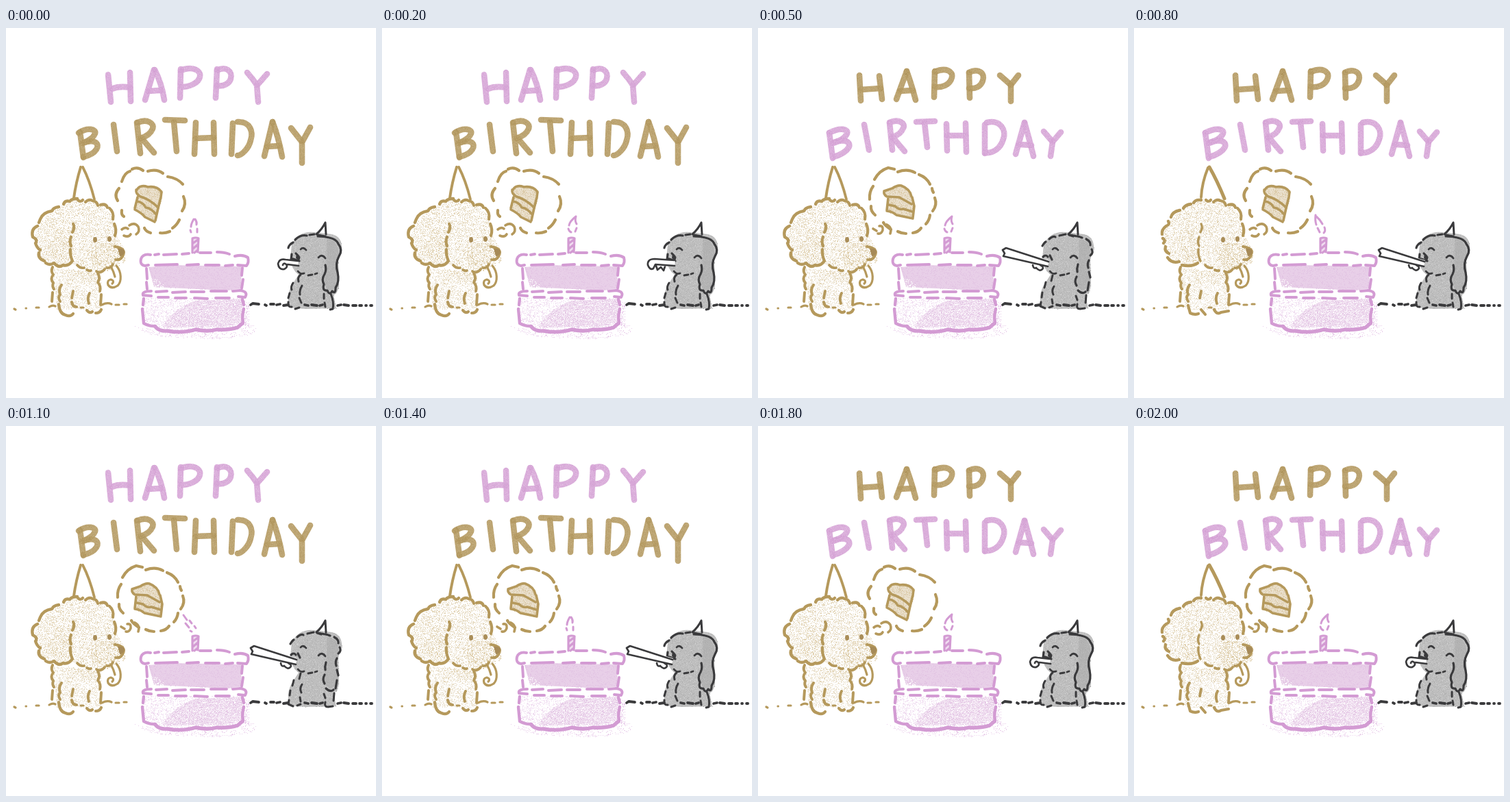
An HTML page with a canvas that plays this animation: 540 by 540 pixels, repeating every 2.1 s.

```html
<!DOCTYPE html>
<html lang="en">
<head>
<meta charset="utf-8">
<title>Happy Birthday</title>
<style>
html, body { margin: 0; width: 100%; height: 100%; overflow: hidden; background: #fff; }
canvas { display: block; width: 540px; height: 540px; }
</style>
</head>
<body>
<canvas id="stage" width="540" height="540" role="img" aria-label="Happy Birthday"></canvas>
<script>
const SIZE = 540, STEP = 100, STEPS = 21;
const TAN = '#b5995c', PINK = '#d39bd3', INK = '#3a3a3c';
const ctx = document.getElementById('stage').getContext('2d');

let seed = 7;
function rand() {
  seed = (seed + 0x6D2B79F5) | 0;
  let t = Math.imul(seed ^ (seed >>> 15), 1 | seed);
  t = (t + Math.imul(t ^ (t >>> 7), 61 | t)) ^ t;
  return ((t ^ (t >>> 14)) >>> 0) / 4294967296;
}

// Every pose is painted once into its own canvas.
function layer(paint, size = SIZE) {
  const c = document.createElement('canvas');
  c.width = c.height = size;
  const g = c.getContext('2d');
  g.lineCap = g.lineJoin = 'round';
  paint(g);
  return c;
}

function lines(g, color, width, d) {
  g.strokeStyle = color;
  g.lineWidth = width;
  g.stroke(new Path2D(d));
}

function shape(g, color, d) {
  g.fillStyle = color;
  g.fill(new Path2D(d));
}

function oval(g, color, x, y, rx, ry) {
  g.fillStyle = color;
  g.beginPath();
  g.ellipse(x, y, rx, ry, 0, 0, 7);
  g.fill();
}

// Scatters single grains inside a path; box is [x, y, w, h].
function grain(g, color, density, [x, y, w, h], d) {
  const path = new Path2D(d);
  g.fillStyle = color;
  for (let n = w * h * density; n > 0; n--) {
    const px = Math.floor(x + rand() * w), py = Math.floor(y + rand() * h);
    if (g.isPointInPath(path, px, py)) g.fillRect(px, py, 1, 1);
  }
}

function crayon(base, light, dark) {
  return ctx.createPattern(layer(g => {
    g.fillStyle = base;
    g.fillRect(0, 0, 64, 64);
    for (let n = 0; n < 1100; n++) {
      g.fillStyle = rand() < .5 ? light : dark;
      g.fillRect(rand() * 64 | 0, rand() * 64 | 0, 1, 1);
    }
  }, 64), 'repeat');
}

const tanWax = crayon('#b69c64', '#bfa772', '#ad935a');
const pinkWax = crayon('#d8a7d8', '#dfb5df', '#d19dd2');

function word(g, wax, letters) {
  g.globalAlpha = .9;
  for (const letter of letters)
    for (const stroke of letter.split('|')) lines(g, wax, 8.6, stroke);
  g.globalAlpha = 1;
}

const lettering = [
  layer(g => {
    word(g, pinkWax, [
      'M149 68L153 108|M181 65L182 107|M154 89Q166 84 181 87',
      'M216 61L203 105|M217 61Q227 80 231 105|M208 92L226 91',
      'M255 60L254 102|M255 62C272 55 285 62 283 71C281 81 267 86 256 86',
      'M308 60L306 102|M308 62C321 55 331 63 328 74C326 81 317 86 308 84',
      'M352 65Q360 74 366 83|M381 67L367 83|M366 83L368 108'
    ]);
    word(g, tanWax, [
      'M108 152L113 189|M106 153C120 144 132 148 130 154Q127 162 112 168|M112 168C130 161 137 169 132 177Q127 185 113 188',
      'M157 141L162 180',
      'M191 138L196 183|M192 138C206 132 217 139 214 147Q210 157 196 161|M198 161L216 182',
      'M232 134L261 135|M245 137L249 180',
      'M277 138L275 184|M303 138L304 184|M277 161L303 160',
      'M331 139L329 184|M338 137C357 136 361 152 357 164C354 177 343 186 338 186',
      'M389 137L377 187|M389 137Q398 160 403 188|M381 173L399 172',
      'M416 146L431 165|M444 145L433 165|M432 167L432 197'
    ]);
  }),
  layer(g => {
    word(g, tanWax, [
      'M148 69L150 106|M177 70L181 104|M150 90L179 88',
      'M217 63L202 104|M217 63Q224 82 230 105|M207 92L226 91',
      'M258 63L257 101|M258 64C274 57 285 63 283 72C280 84 268 87 258 86',
      'M308 65L309 102|M308 65C322 58 332 66 328 77C325 86 317 89 308 88',
      'M353 69L369 83|M380 69L369 83|M369 84L369 107'
    ]);
    word(g, pinkWax, [
      'M104 153L109 190|M104 153C121 144 132 148 130 154Q126 163 109 168|M109 168C127 160 137 167 132 175Q126 184 110 188',
      'M155 141L162 178',
      'M192 138L196 178|M192 138C205 132 216 139 212 146Q208 156 196 159|M197 160L214 180',
      'M231 137L258 136|M243 138L247 174',
      'M275 140L276 179|M303 139L304 181|M276 157L303 157',
      'M331 141L331 183|M334 138C354 133 363 150 358 162C354 176 343 183 332 182',
      'M389 138L376 184|M389 138Q396 162 402 187|M381 170L399 171',
      'M417 151L429 165|M442 152L430 166|M430 166L427 187'
    ]);
  })
];

const paleDog = [0, 1].map(alt => layer(g => {
  const head = 'M100 250C130 246 158 262 160 300L174 326L160 346Q130 362 98 344C60 352 44 336 42 304Q52 266 100 250Z';
  const body = 'M68 350L138 356L138 410H74Z';
  grain(g, '#e9dfca', .3, [40, 248, 135, 110], head);
  grain(g, '#e0d0ae', .1, [40, 248, 135, 110], head);
  grain(g, '#dccaa4', .22, [120, 310, 54, 46], 'M128 316Q150 308 174 322V340Q160 352 140 356Q112 340 128 316Z');
  grain(g, '#e0d0ae', .14, [58, 282, 42, 62], 'M76 290Q98 284 96 314V344Q62 342 60 320Z');
  grain(g, '#e9dfca', .35, [68, 348, 72, 66], body);
  grain(g, '#e0d0ae', .15, [78, 346, 60, 30], 'M84 350L134 356L130 372L90 374Z');

  lines(g, TAN, 4, alt ? 'M108 204Q99 226 98 247' : 'M109 203Q102 226 99 248');
  lines(g, TAN, alt ? 5 : 3.8, alt ? 'M110 203Q121 222 132 249' : 'M112 203Q122 222 129 250');
  // hair and ear
  lines(g, TAN, 4.4, alt
    ? 'M98 251Q90 250 87 255M83 257Q75 258 72 263M67 266Q56 268 54 276M50 282Q53 287 47 289Q40 294 41 301M42 307Q47 310 43 314M46 319Q44 326 51 329M49 335Q55 344 66 341M70 346Q85 349 93 343'
    : 'M104 249Q96 249 93 253Q86 251 84 257M77 261Q69 262 67 267Q54 269 50 279L48 284M46 289Q36 293 39 305Q47 309 43 314Q45 321 50 324M48 328Q46 336 56 340M58 343Q64 347 70 343Q77 351 83 346Q91 348 96 341');
  lines(g, TAN, alt ? 3.4 : 4.2, 'M98 286Q101 291 97 298M95 305Q92 312 95 318M94 323Q93 331 97 340');
  lines(g, TAN, 4.2, 'M105 251Q109 255 112 251M116 254Q121 249 126 252Q133 253 134 259M138 258Q146 256 148 262M151 263Q158 269 156 279M158 286Q162 294 159 303');
  lines(g, TAN, 3.8, 'M104 346Q108 351 114 350M118 353Q122 355 124 354M132 355Q138 359 144 352M147 350Q153 351 156 345M159 319Q172 321 172 328Q169 340 160 338');
  shape(g, '#a68a57', 'M163 322Q173 321 173 327Q171 333 166 333Z');
  oval(g, '#a98d58', 130, 309, 3, 4);
  oval(g, '#a98d58', 151, 308, 3, 4);
  // party blower
  lines(g, TAN, 3.2, 'M153 348Q157 355 159 363M161 347C169 356 169 370 163 376Q154 382 149 375Q147 368 153 367Q159 369 155 373');
  // body
  lines(g, TAN, 4, 'M68 349Q65 355 69 360Q64 366 69 372Q67 377 70 381M68 386L67 399M81 375Q76 382 79 389Q75 393 79 399M98 384L96 394M122 387Q118 394 121 402M134 358Q138 365 134 371Q139 377 137 384M139 389L138 404');
  lines(g, TAN, 4.2, alt
    ? 'M79 405L82 416Q88 419 94 417M98 411L104 418M117 411Q121 419 127 415L138 413'
    : 'M77 403Q78 417 87 419Q94 422 98 417M96 400Q97 407 103 407M118 412Q122 417 126 414M131 416Q137 416 139 411');
  lines(g, TAN, 3.2, 'M12 410L14 411M29 409h.5M44 408h4M63 407Q68 404 72 406M109 408h4M140 404Q148 400 154 403M160 404h5M172 403h4');
}));

const thought = [0, 1].map(alt => layer(g => {
  lines(g, TAN, 4.2, alt
    ? 'M170 221Q177 208 190 204L199 206M204 210Q218 205 229 211M235 214Q246 218 251 228M254 234Q254 237 256 240M258 248Q262 258 255 267M251 273Q250 281 245 286M238 292Q234 298 226 299M216 300Q210 300 204 297M194 294Q185 288 183 284M171 273Q164 267 165 260M163 250Q162 239 168 231'
    : 'M169 224Q173 211 181 209M184 206Q192 202 200 208M207 209Q220 205 229 212M236 217Q250 219 258 228M259 246Q264 257 257 267M253 280Q249 288 243 292M239 297Q232 300 225 299M211 299Q204 297 202 292M172 275Q168 273 169 266M163 252Q157 243 165 234');
  lines(g, TAN, 3.6, alt
    ? 'M168 293L173 296M177 289Q183 288 182 295Q180 301 175 300M188 287Q196 291 193 300'
    : 'M169 294Q174 290 178 293M172 303Q179 306 182 301M180 288Q188 283 193 290Q196 297 190 301');
  const body = alt
    ? 'M183 238Q196 234 208 229Q223 236 224 247L228 257Q228 268 226 279Q206 276 188 268L189 249Z'
    : 'M190 236Q195 228 206 232Q220 230 228 240Q227 252 223 264L217 284Q202 278 188 264L192 252Z';
  shape(g, '#eae0cd', body);
  grain(g, '#dbcaa8', .35, [183, 228, 48, 56], body);
  lines(g, TAN, 3.6, alt
    ? 'M184 238L196 234Q203 229 209 230Q222 235 224 246M184 238Q183 243 188 246L206 247L224 257M190 248L188 266M188 267Q197 268 202 273L226 278M225 247L228 260L226 277M191 258L200 260Q206 266 212 264L225 268'
    : 'M191 236Q196 228 207 232Q220 230 227 239L226 247M190 236Q189 242 196 246Q210 250 222 262M192 247L188 263M188 265Q198 270 203 276L217 283M226 247L222 263L218 281M191 253Q200 254 204 262Q212 263 219 272');
}));

const cake = layer(g => {
  const upper = 'M208 349L245 346L343 348L344 380L322 383L216 378Z';
  shape(g, '#e8cfe8', upper);
  grain(g, '#e2c4e3', .2, [205, 346, 140, 38], upper);
  grain(g, '#ffffff', .3, [205, 360, 40, 24], 'M207 360L226 370L236 383H207Z');
  grain(g, '#eed9ef', .25, [200, 394, 146, 50], 'M201 394H346V434L310 442L240 444L200 432Z');
  const band = 'M276 398L345 395L344 428L318 436L228 437Q240 412 276 398Z';
  shape(g, 'rgba(235,212,235,.65)', band);
  grain(g, '#e4c7e5', .3, [225, 394, 120, 46], band);
  grain(g, '#ffffff', .14, [225, 394, 120, 46], band);
  grain(g, '#eacfeb', .16, [188, 428, 178, 27], 'M188 435Q230 446 350 428Q374 437 358 447L322 453Q240 454 206 446Z');
  grain(g, '#e8ccea', .3, [345, 396, 11, 40], 'M345 396L354 400V436H345Z');

  // lid, plate and lower tier
  lines(g, PINK, 4, 'M211 331Q200 329 197 337Q195 346 203 347L208 346M217 331L223 330M230 331L249 330M257 330L267 329M283 328L299 328M308 327Q318 327 326 330M334 333Q346 330 353 335Q355 342 351 347L338 346M218 346L250 345M264 346L281 345M291 346L311 346M320 347L331 346');
  lines(g, PINK, 4, 'M205 351L206 366M205 371L206 381M345 350L344 361M346 367L344 380M212 384Q198 384 200 390L212 391M219 385L235 384M243 386L262 385M270 385L289 385M299 384L322 384M331 384L342 383Q354 385 349 393L339 392M222 393L237 393M247 394L263 394M275 394L294 395M306 394L326 394');
  lines(g, PINK, 4.4, 'M201 395L200 404M199 410L201 431Q211 436 218 435M345 396L347 404M347 410Q344 422 346 430');
  lines(g, PINK, 5.4, 'M218 436Q224 443 235 442Q257 446 277 440Q295 444 308 440Q327 441 338 437L345 431');
  shape(g, '#f0dcf0', 'M272 307H281L280 328H272Z');
  lines(g, PINK, 3.2, 'M272 307Q277 305 281 307L280 327M272 308L272 328M273 314L280 309M273 322L280 316M275 328L280 324');
});

const flames = [
  'M274 279Q270 286 270 290M269 295L270 298M276 279Q279 283 278 287M279 293L279 298',
  'M283 275Q274 282 273 288M272 293Q273 297 276 298M283 275Q281 281 284 286M284 292L282 297',
  'M265 273Q264 281 266 287M268 292L271 298M266 275Q272 280 275 286M278 291Q280 296 277 299',
  'M259 276L264 283M262 288L267 294M268 284L271 288M275 292L277 295M269 299L271 300'
].map(d => layer(g => lines(g, PINK, 3, d)));

const greyDog = [0, 1].map(alt => layer(g => {
  const coat = 'M417 316Q427 296 449 298L476 301Q491 305 490 322L485 338L486 376Q484 388 478 390L482 409L437 410L414 408Q408 390 418 374L427 360Q416 352 415 336Z';
  shape(g, '#bebebe', coat);
  grain(g, '#b2b2b2', .18, [410, 296, 82, 115], coat);
  grain(g, '#cecece', .12, [410, 296, 82, 115], coat);
  shape(g, 'rgba(165,165,165,.45)', 'M468 308Q486 308 485 334L484 376Q470 390 464 372Q470 340 468 308Z');

  lines(g, INK, 3, 'M466 284Q461 294 453 301M466 284L467 301M455 302L466 304');
  lines(g, INK, 3.2, alt
    ? 'M415 318Q418 313 420 312M425 308Q431 303 434 305M440 303L449 301M454 302L460 304M467 304L473 306M479 308Q486 312 485 317M487 323Q490 328 485 332M483 339Q480 344 482 350M483 356L485 364M483 371L481 383M467 345Q465 351 466 356M465 363Q461 370 465 376M467 383Q473 389 478 385'
    : 'M412 321Q413 316 419 313M422 309Q430 301 439 303M443 302L450 301M455 304Q464 304 472 306Q482 308 485 315Q492 324 486 333Q480 344 484 357Q487 370 481 379Q481 389 476 384Q472 391 469 383Q461 384 464 374Q460 367 465 359Q468 353 466 346');
  // face
  lines(g, INK, 2.8, 'M430 323Q434 319 438 324M456 335Q461 329 466 336M426 355Q430 360 435 358M441 361L447 360M451 359L454 358');
  lines(g, INK, 3.2, alt ? 'M416 334Q420 330 423 334M426 332L429 338M417 340L421 344' : 'M417 330L416 338M423 329Q427 332 427 337M419 337L428 340');
  if (!alt) shape(g, INK, 'M424 329Q432 333 428 339L423 336Z');
  // legs
  lines(g, INK, 3, alt
    ? 'M430 361L428 369M420 371L418 379M415 386L414 393M432 377Q428 383 431 389M429 396L430 402M413 400L412 406L419 409M425 408L430 406M464 391L466 397M466 403Q464 410 470 410L477 409M479 390L478 401'
    : 'M430 360Q425 364 427 370M419 372Q415 378 417 382M414 387L412 394M432 376Q428 383 429 389M428 394L431 401M412 400Q411 408 417 407M422 410L428 408M464 388L464 395M465 401L466 407M474 388Q479 400 477 410L473 411');
  lines(g, INK, 3.8, 'M357 404L360 402L369 403M378 404L380 405M386 403L391 403M395 404L400 403M405 405L412 404M436 404L441 405M446 404L454 405M458 405L462 404M484 405L489 404M493 404L500 405M506 405L511 405M516 405L519 405M525 405h1M532 405L534 405');
}));

const blowers = [
  ['M427 340L409 338Q399 335 397 343Q397 352 405 353Q413 351 411 345L426 348Z',
   'M427 347L411 345M426 340L408 338Q399 336 397 344Q398 353 406 352Q412 349 409 345Q405 342 404 346'],
  ['M428 339L397 337Q387 337 388 346Q391 354 397 352L402 347L427 347Z',
   'M427 339L398 337Q387 337 388 346Q391 354 396 351L399 345L427 347M400 347L402 353L407 349L411 354L413 348'],
  ['M357 323L362 321L425 339L423 347L359 333Z',
   'M424 341L362 321L357 324L360 329L358 333L423 348M401 346Q402 352 406 350Q411 356 415 352Q418 349 412 346']
].map(([fill, line]) => layer(g => {
  shape(g, '#fff', fill);
  lines(g, INK, 2.7, line);
}));

function blowerPose(i) {
  if (i < 2 || i > 17) return 0;
  return i < 4 || i > 14 ? 1 : 2;
}

function frame(now) {
  const i = Math.floor(now / STEP) % STEPS;
  const every = (n, shift) => Math.floor((i + shift) / n);
  const beat = every(4, 1);
  ctx.fillStyle = '#fff';
  ctx.fillRect(0, 0, SIZE, SIZE);
  [
    lettering[every(6, 3) % 2],
    paleDog[beat % 3 === 2 ? 1 : 0],
    thought[beat % 2],
    cake,
    flames[every(4, 2) % 4],
    greyDog[every(3, 0) % 2],
    blowers[blowerPose(i)]
  ].forEach(part => ctx.drawImage(part, 0, 0));
  requestAnimationFrame(frame);
}
frame(performance.now());
</script>
</body>
</html>
```
